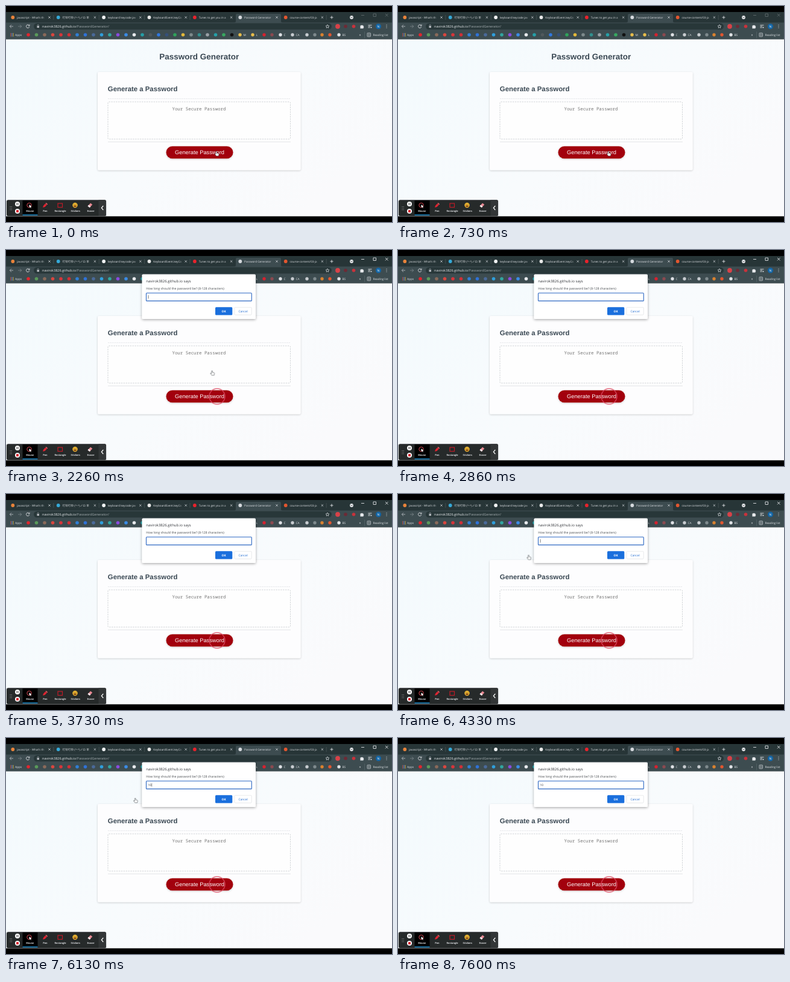
These frames come from a looping animation (640x360 px, 8000 ms). An HTML page:

```html
<!DOCTYPE html>
<html lang="en">
<head>
<meta charset="utf-8">
<title>Password Generator</title>
<style>
:root { --strip: #273537; --bar: #3d4c50; --field: #283739; }
html, body { margin: 0; width: 100%; height: 100%; overflow: hidden; background: #000; }
svg { display: block; width: 100vw; height: 100vh; }
text { font-family: "Open Sans", "Noto Sans CJK SC", "Noto Sans CJK JP", sans-serif; text-rendering: geometricPrecision; white-space: pre; }
.page text { font-family: "Liberation Sans", Arial, sans-serif; fill: #3b4954; }
.page .mono { font-family: "Noto Sans Mono", "DejaVu Sans Mono", monospace; fill: #757575; }
.page .white { fill: #fff; }
.bold { font-weight: 700; }
.mid { text-anchor: middle; }
.line { fill: none; stroke: #dfe1e5; stroke-width: .9; }
.thin { stroke-width: .7; }
.strip { fill: var(--strip); }
.bar { fill: var(--bar); }
.field { fill: var(--field); }

.step { animation: 8s step-end infinite; }
.open { animation-name: open; }
.one { animation-name: one; }
.zero { animation-name: zero; }
.blink { animation-name: blink; }
.shift { animation-name: shift; }
.focus { animation-name: focus; }
.ring { transform-box: fill-box; transform-origin: center; animation: ring 8s linear infinite; }
.pointer { animation: pointer 8s ease-in-out infinite; }

@keyframes open { 0% { opacity: 0 } 13.375%, 100% { opacity: 1 } }
@keyframes one { 0% { opacity: 0 } 73.25%, 100% { opacity: 1 } }
@keyframes zero { 0% { opacity: 0 } 75%, 100% { opacity: 1 } }
@keyframes focus { 0% { opacity: .3 } 13.375%, 100% { opacity: 1 } }
@keyframes blink {
  0%, 20%, 33.25%, 46.625%, 59.94%, 81.625%, 94.875%, 100% { opacity: 0 }
  13.375%, 26.625%, 39.94%, 53.25%, 66.5%, 88.25% { opacity: 1 }
}
@keyframes shift {
  0% { transform: none }
  73.25% { transform: translateX(2.7px) }
  75%, 100% { transform: translateX(5.5px) }
}
@keyframes ring {
  0%, 11.6% { opacity: 0; transform: scale(.3) }
  11.7% { opacity: 1; transform: scale(.3) }
  14%, 100% { opacity: 1; transform: none }
}
@keyframes pointer {
  0%, 25% { transform: translate(349px, 242px) }
  34%, 50% { transform: translate(322px, 92px) }
  54%, 63.25% { transform: translate(216.5px, 101.5px) }
  67.5%, 77.5% { transform: translate(214.3px, 100px) }
  80.5%, 100% { transform: translate(345px, 97px) }
}
</style>
</head>
<body>
<svg viewBox="0 0 640 360" preserveAspectRatio="none">
  <defs>
    <linearGradient id="fade"><stop style="stop-color: var(--strip)" stop-opacity="0"/><stop offset="1" style="stop-color: var(--strip)"/></linearGradient>
    <linearGradient id="paper" x2="1" y2=".6"><stop stop-color="#f3fafd"/><stop offset=".6" stop-color="#f8fbfd"/><stop offset="1" stop-color="#fafafc"/></linearGradient>
    <filter id="soft" x="-10%" y="-10%" width="120%" height="130%"><feDropShadow dx="0" dy="1" stdDeviation="1.6" flood-opacity=".2"/></filter>
    <filter id="deep" x="-10%" y="-10%" width="120%" height="130%"><feDropShadow dx="0" dy="1.2" stdDeviation="2" flood-opacity=".35"/></filter>
  </defs>

  <!-- tab strip -->
  <rect width="640" height="360"/>
  <rect class="strip" y="10" width="640" height="18"/>
  <rect class="bar" y="27.5" width="640" height="28"/>
  <path class="bar" d="M378 28q3 0 3-3V15q0-2 2-2h71q2 0 2 2v10q0 3 3 3z"/>
  <g id="tabs"></g>
  <path class="line" d="M537.5 19h5M540 16.5v5"/>
  <circle cx="573" cy="19" r="2.9" fill="#e8eaed"/>
  <path d="M571.5 18.3l1.5 1.5 1.5-1.5" fill="none" stroke="#202124" stroke-width=".8"/>
  <path class="line step focus" d="M589 15.5h5M609 13h4.5v4.5H609zM629 13l4.5 4.5M633.5 13l-4.5 4.5"/>

  <!-- address row -->
  <path class="line" d="M12 34H6.5M9 31.3L6.3 34 9 36.7" opacity=".7"/>
  <path class="line" d="M20 34h5.5M23 31.3l2.7 2.7-2.7 2.7" opacity=".35"/>
  <path class="line" d="M38.3 32.2a2.7 2.7 0 1 0 .5 2.5M39 30.8v2.2h-2.3"/>
  <rect class="field" x="46" y="28.7" width="494" height="10.6" rx="5.3"/>
  <rect x="51.4" y="33.2" width="3.6" height="3" rx=".4" fill="#bdc1c6"/>
  <path d="M52 33.3v-1a1.2 1.2 0 0 1 2.4 0v1" fill="none" stroke="#bdc1c6" stroke-width=".6"/>
  <text x="60" y="36" font-size="5.52" fill="#a5adb0"><tspan fill="#e8eaed">navirok3826.github.io</tspan>/PasswordGenerator/</text>
  <path class="line thin" d="M533 31l.9 2 2.1.2-1.6 1.4.5 2.1-1.9-1.1-1.9 1.1.5-2.1-1.6-1.4 2.1-.2z"/>
  <circle cx="550" cy="34" r="3.9" fill="#d84248"/>
  <circle cx="563" cy="34" r="2.8" fill="#6d2a35"/>
  <circle cx="576.5" cy="34" r="2.8" fill="#c9323b"/>
  <path d="M587.4 32.5h1.6a1.2 1.2 0 0 1 2.2 0h1.4v1.5a1.1 1.1 0 0 1 0 2.1v1.3h-5.2z" fill="#e8eaed"/>
  <path class="line" d="M600.5 32h6M600.5 34h3.5M600.5 36h3"/>
  <circle cx="605.5" cy="35.7" r="1" fill="#dfe1e5"/>
  <circle cx="617.5" cy="34" r="4.5" fill="#1467a8"/>
  <text class="mid" x="617.5" y="35.9" font-size="5" fill="#fff">N</text>
  <path d="M631 31.5v5.2" stroke="#e8eaed" stroke-width="1.1" stroke-linecap="round" stroke-dasharray="0 2.4"/>

  <!-- bookmarks -->
  <g id="marks"></g>
  <text x="585.5" y="50" font-size="6" fill="#e8eaed">»</text>
  <path d="M594.5 42.5v11" stroke="#657276" stroke-width=".5"/>
  <rect class="line thin" x="599" y="45" width="5.5" height="6" rx=".7"/>
  <path class="line thin" d="M600.3 47h3M600.3 49h3"/>
  <text x="608.5" y="49.8" font-size="4.7" fill="#e8eaed">Reading list</text>

  <!-- page -->
  <g class="page">
    <rect y="55.5" width="640" height="295" fill="url(#paper)"/>
    <text class="bold mid" x="320.2" y="89" font-size="13.5">Password Generator</text>
    <rect x="152" y="110" width="336.5" height="163.5" rx="2" fill="#fdfdfe" filter="url(#soft)"/>
    <text class="bold" x="168.8" y="142.3" font-size="11.38">Generate a Password</text>
    <path d="M169 154.5h303" stroke="#dcdfe2" stroke-width=".7" stroke-dasharray="2 1"/>
    <rect x="169" y="159.8" width="302.5" height="62" rx="1.5" fill="#fefefe" stroke="#c6cacd" stroke-width=".8" stroke-dasharray="2.4 1.5"/>
    <text class="mono mid" x="320" y="173.7" font-size="7.43">Your Secure Password</text>
    <path d="M169 226.5h303" stroke="#dfe1e3" stroke-width=".8"/>
    <rect x="265.5" y="233.7" width="111" height="20.6" rx="10.3" fill="#a2030a" filter="url(#soft)"/>
    <text class="mid white" x="321" y="247.3" font-size="9.28">Generate Password</text>
    <circle class="ring" cx="350" cy="244" r="13" fill="none" stroke="#dc4a60" stroke-opacity=".8" stroke-width="1.6"/>
  </g>

  <path class="pointer" d="M-.8.7Q0-.5.8.7V3l2.6.7q.8.3.6 1.3L3.4 7.9H-.4L-2.6 5q-.3-1 .7-.8l1.1.7z" fill="#fff" stroke="#33383c" stroke-width=".55"/>

  <!-- prompt -->
  <g class="step open">
    <rect x="225.5" y="40.5" width="188.5" height="74.5" rx="1.8" fill="#fff" filter="url(#deep)"/>
    <text x="232.3" y="54.2" font-size="6" fill="#303338">navirok3826.github.io says</text>
    <text x="232.3" y="66.2" font-size="5.23" fill="#45494d">How long should the password be? (8-128 characters)</text>
    <rect x="232.5" y="71.7" width="174.8" height="13.2" rx="1" fill="#fff" stroke="#2a66c2" stroke-width="1.1"/>
    <text class="step one" x="235.6" y="80" font-size="4.8" fill="#303338">1</text>
    <text class="step zero" x="238.35" y="80" font-size="4.8" fill="#303338">0</text>
    <g class="step shift"><path class="step blink" d="M236 75.4v5.6" stroke="#222" stroke-width=".6"/></g>
    <rect x="347" y="95.2" width="28.3" height="13.2" rx="1.5" fill="#1a6fdd"/>
    <text class="bold mid" x="361.1" y="103.6" font-size="4.8" fill="#fff">OK</text>
    <rect x="379" y="95.4" width="28.2" height="12.8" rx="1.5" fill="#fff" stroke="#dadce0" stroke-width=".6"/>
    <text class="mid" x="393.1" y="103.6" font-size="4.9" fill="#1a67cf">Cancel</text>
  </g>

  <!-- recorder bar -->
  <rect x="1" y="323.2" width="165" height="26.8" rx="2.5" fill="#282a2b" filter="url(#soft)"/>
  <path d="M153.5 323.2h10q2.5 0 2.5 2.5v21.8q0 2.5-2.5 2.5h-10z" fill="#333637"/>
  <path d="M7 334v6.5M9.2 334v6.5" stroke="#9a9a9a" stroke-dasharray="1 1.6"/>
  <circle cx="19" cy="330" r="4" fill="#fff"/>
  <path d="M17.9 328.3v3.4M20.1 328.3v3.4" stroke="#222" stroke-width=".9"/>
  <circle cx="19" cy="342" r="4" fill="#fff"/>
  <rect x="17" y="340" width="4" height="4" rx=".5" fill="#d5232f"/>
  <rect x="27.5" y="324" width="25" height="25"/>
  <rect x="27.5" y="347.6" width="25" height="1.4" fill="#2299dd"/>
  <circle cx="38.5" cy="332" r="3.7" fill="none" stroke="#d94a54"/>
  <path d="M38.5 331l4 3.2-1.7.2 1 2-.9.4-.9-2-1.3 1.1z" fill="#fff"/>
  <path d="M61 335.8l1-3 3.2-3.6 2.6 2.4-3.4 3.4z" fill="#e02431"/>
  <path d="M65.6 328.8l1-.9 2.5 2.3-.9 1z" fill="#f36a70"/>
  <rect x="86" y="329" width="7.5" height="6.5" fill="none" stroke="#c01c28" stroke-width="1.2"/>
  <circle cx="114.5" cy="332" r="4.2" fill="#f0bb35"/>
  <path d="M112 332.5h5a2.5 2.5 0 0 1-5 0z" fill="#7b3b14"/>
  <path d="M113 329.8v1.3M116 329.8v1.3" stroke="#5b3510" stroke-width=".9"/>
  <path d="M135.5 333.5l4.6-5 3.2 2.6-4.6 5z" fill="#e98a94"/>
  <path d="M135.5 333.5l1.7-1.9 3.2 2.6-1.7 1.9z" fill="#f3ebec"/>
  <g id="tools"></g>
  <path d="M161.3 333l-3 3.5 3 3.5" fill="none" stroke="#fff" stroke-width="1.2"/>
</svg>
<script>
const put = (id, parts) => document.getElementById(id).innerHTML = parts.join("");
const label = (x, y, size, text, extra = "") =>
  `<text x="${x}" y="${y}" font-size="${size}" fill="#e2e4e8" ${extra}>${text}</text>`;
const dot = (x, y, r, color) => `<circle cx="${x}" cy="${y}" r="${r}" fill="${color}"/>`;

const tabs = [
  ["javascript - What's th", "#e8833a"], ["叮铃叮铃 (^-^)ノロ 早", "#35a9d8"],
  ["keyboard keycode jav", "#f1f3f4"], ["KeyboardEvent.keyCo", "#e9e9e9"],
  ["Tunes to get you in a", "#e8222c"], ["Password Generator", "#d5d9dd"],
  ["course-content/03-ja", "#e2562f"]
];
put("tabs", tabs.map(([title, color], i) => {
  const x = 11.3 + i * 75.4, active = i === 5;
  const fade = active ? "" : `<rect x="${x + 49}" y="14" width="9" height="10" fill="url(#fade)"/>
    <rect class="strip" x="${x + 58}" y="14" width="9" height="10"/>`;
  const edge = i === 4 || active ? "" : `<path d="M${x + 67.5} 15v8" stroke="#5c686b" stroke-width=".5"/>`;
  return dot(x, 19, 2.9, color) + label(x + 6.8, 20.8, 4.68, title) + fade + edge +
    `<path class="line thin" d="M${x + 59} 17.3l3.4 3.4m0-3.4l-3.4 3.4"/>`;
}));

// Evenly spaced bookmark icons, then the named ones.
const colors = ("#e0262e #5a9a5a #8a6a5a #d9463f #d8353a #cf2f36 #2f7fd6 #2f72d8 #4a6a9a #2f9fdc #31a6a0 " +
  "#8a4be0 #3b8ce6 #e8eaed #25a0a8 #50595c #2f78e0 #34507a #2fa35a #e3b93a #7d8a8c #31908f #9aa0a6 " +
  "#25a0a8 #37a860 #111111").split(" ");
const named = [
  [388, "#e8bd4a", "M"], [409, "#e8bd4a", "L"], [428, "#d5222f", ""], [441, "#8b4a50", ""],
  [455, "#dfe1e5", "C"], [475, "#c8ccd0", "CA"], [499, "#c8ccd0", ""], [512, "#7f8a8d", ""],
  [524, "#d9822f", ""], [537, "#e2562f", ""], [552, "#e0e3e6", "BS"]
];
const grid = Array.from({ length: 9 }, (_, i) =>
  dot(8 + i % 3 * 2, 46 + (i / 3 | 0) * 2, .75, ["#e85a4f", "#4c8df6", "#f2bd35"][i % 3]));
put("marks", [
  ...grid, label(15, 49.8, 4.8, "Apps"),
  ...colors.map((c, i) => dot(37 + i * 13.5, 48, 2.8, c)),
  ...named.map(([x, c, text]) => dot(x, 48, 2.7, c) + label(x + 5.5, 49.8, 4.8, text))
]);

put("tools", ["Mouse", "Pen", "Rectangle", "Stickers", "Eraser"].map((name, i) =>
  label(39.7 + i * 25.2, 343.4, 3.9, name, 'class="bold mid"')));
</script>
</body>
</html>
```
